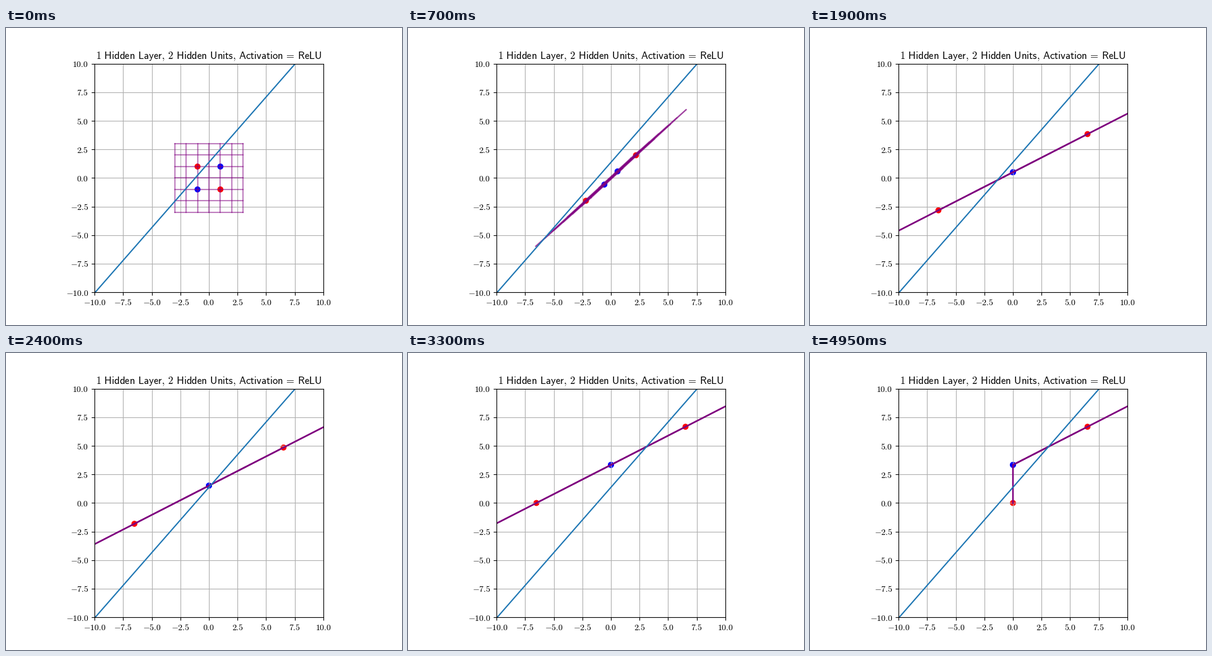
Write a matplotlib script that moves like this. It is 640 px wide and 480 px high and loops after 5000 ms.

```python
import numpy as np
import matplotlib.pyplot as plt
from matplotlib.animation import FuncAnimation

plt.rcParams["mathtext.fontset"] = "cm"

FRAMES, INTERVAL = 100, 50
STAGE = 33  # frames per stage: weights, bias, activation

WEIGHTS = np.array([[-3.26, 3.26], [-1.667, 1.667]])
BIAS = np.array([0.0, 3.333])
POINTS = np.array([[-1, 1], [1, -1], [-1, -1], [1, 1]], float)
COLORS = ["red", "red", "blue", "blue"]


def grid_lines(extent=3):
    """Rows and columns of an integer lattice, as arrays of points."""
    steps = np.arange(-extent, extent + 1.0)
    rows = [np.column_stack([steps, np.full_like(steps, k)]) for k in steps]
    return rows + [row[:, ::-1] for row in rows]


def progress(frame, stage):
    return min(max(frame / STAGE - stage, 0), 1)


def transform(pts, frame):
    """Blend from the identity through weights, bias and ReLU."""
    a, b, c = (progress(frame, k) for k in range(3))
    matrix = (1 - a) * np.eye(2) + a * WEIGHTS
    out = pts @ matrix.T + b * BIAS
    return (1 - c) * out + c * np.maximum(out, 0)


def sans(text):
    """Sans math text with ordinary word spacing."""
    for old, new in ((", ", r",\hspace{0.18}"),
                     (" = ", r"\hspace{0.18}=\hspace{0.18}"),
                     (" ", r"\hspace{0.38}")):
        text = text.replace(old, new)
    return rf"$\mathsf{{{text}}}$"


fig, ax = plt.subplots(figsize=(6.4, 4.8), dpi=100)
ax.set_aspect("equal")
ax.set(xlim=(-10, 10), ylim=(-10, 10))
ticks = np.arange(-10, 10.1, 2.5)
labels = [f"${t:.1f}$" for t in ticks]
ax.set_xticks(ticks, labels)
ax.set_yticks(ticks, labels)
ax.grid(True)
ax.set_title(sans("1 Hidden Layer, 2 Hidden Units, Activation = ReLU"))

lattice = grid_lines()
lines = [ax.plot(*pts.T, color="purple", alpha=0.5)[0] for pts in lattice]
dots = ax.scatter(*POINTS.T, c=COLORS)
xs = np.array([-10, 10])
ax.plot(xs, 1.37 + 1.143 * xs, color="C0")


def update(frame):
    for line, pts in zip(lines, lattice):
        line.set_data(*transform(pts, frame).T)
    dots.set_offsets(transform(POINTS, frame))
    return [*lines, dots]


anim = FuncAnimation(fig, update, frames=FRAMES, interval=INTERVAL,
                     repeat=True, repeat_delay=0)
plt.show()
```
